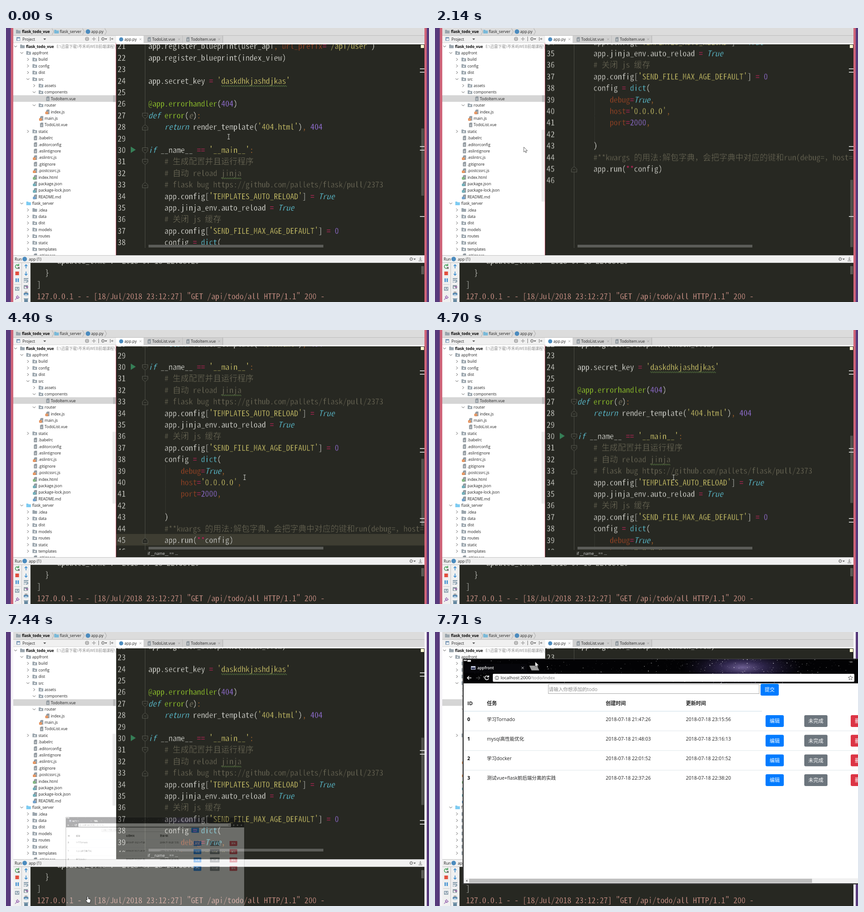
An HTML page that plays this animation: 929x603 px, repeating every 8000 ms.

```html
<!DOCTYPE html>
<html lang="zh">
<head>
<meta charset="utf-8">
<title>Editor session</title>
<style>
html, body { margin: 0; width: 100%; height: 100%; overflow: hidden; background: #573a7c; }
svg { display: block; width: 929px; height: 603px; }
text { font: 8.6px "Open Sans", "Noto Sans", "Noto Sans CJK SC", sans-serif; fill: #222; white-space: pre; }
.bold { font-size: 8.3px; font-weight: 700; fill: #000; }
.dim { fill: #8c8c8c; }
/* The background-coloured outline thins the strokes to a light weight. */
.code { font-family: "Noto Sans Mono CJK SC", "Liberation Mono", monospace; fill: #f8f8f2; stroke: #272822; stroke-width: .45px; }
.comment { fill: #75715e; }
.string { fill: #e6db74; }
.name { fill: #a6e22e; }
.key { fill: #66d9ef; font-style: italic; }
.builtin { fill: #66d9ef; }
.named { fill: #aa4926; }
.num { fill: #ae81ff; }
.op { fill: #f92672; }
.punct { fill: #cc7832; }
.param { fill: #8a8672; font-style: italic; }
.log { fill: #eda79b; }
.page { font-size: 10.5px; }
.head { font-size: 11px; font-weight: 700; }
.btn { font-size: 11px; fill: #fff; text-anchor: middle; }
</style>
</head>
<body>
<svg id="stage" viewBox="0 0 929 603"></svg>
<script>
const LOOP = 8000, LINE = 25.4, CHAR = 8.9, DARK = '#272822';

const rect = (x, y, w, h, fill, more = '') => `<rect x="${x}" y="${y}" width="${w}" height="${h}" fill="${fill}" ${more}/>`;
const text = (x, y, body, cls = '') => `<text x="${x}" y="${y}" class="${cls}">${body}</text>`;
const fill = (d, color, more = '') => `<path d="${d}" fill="${color}" ${more}/>`;
const line = (d, color, width = 1, more = '') => `<path d="${d}" fill="none" stroke="${color}" stroke-width="${width}" ${more}/>`;
const dot = (x, y, r, color) => `<circle cx="${x}" cy="${y}" r="${r}" fill="${color}"/>`;
const at = (x, y, body) => `<g transform="translate(${x} ${y})">${body}</g>`;
const clip = (id, x, y, w, h) => `<clipPath id="${id}">${rect(x, y, w, h, '#000')}</clipPath>`;
const clipped = (id, body) => `<g clip-path="url(#${id})">${body}</g>`;

// The monospaced size follows from the column width.
const pen = document.createElement('canvas').getContext('2d');
pen.font = '100px "Noto Sans Mono CJK SC", "Liberation Mono", monospace';
const codeSize = 100 * CHAR / pen.measureText('M').width;

const folder = (x, y, color, mark) => at(x, y,
  fill('M-5-4h4l1 1.5h5v6.5h-10z', color) + (mark ? rect(-1.5, -.5, 3, 2.5, '#fff') : ''));
const badges = { js: '#e07b39', html: '#5fa35f', json: '#4a9aa8', md: '#4a88c0' };
const file = (x, y, name) => {
  const badge = badges[name.split('.').pop()];
  return at(x, y, fill('M-1-5h5v10h-7v-8z', '#939ba1') + line('M-1 0h3M-1 2h3', '#fff', .8) +
    (badge ? rect(-5, 0, 6, 5, badge) + line('M-4 2.5h4', '#fff', .8) : ''));
};
const chevron = (x, y, open) => at(x, y, line(open ? 'M-3-1.5l3 3 3-3' : 'M-1.5-3l3 3-3 3', '#555'));
const gear = (x, y) => at(x, y, `<circle r="2.7" fill="none" stroke="#666" stroke-width="2" stroke-dasharray="1.4 .7"/>`);

// Sidebar rows: depth, then + folded, - open or = file.
const tree = `0-flask_todo_vue 1-appfront 2+build 2+config 2+dist 2-src 3+assets 3-components 4=TodoItem.vue
3-router 4=index.js 3=main.js 3=TodoList.vue 2+static 2=.babelrc 2=.editorconfig 2=.eslintignore
2=.eslintrc.js 2=.gitignore 2=.postcssrc.js 2=index.html 2=package.json 2=package-lock.json 2=README.md
1-flask_server 2+.idea 2+data 2+dist 2+models 2+routes 2+static 2+templates 2=.gitignore`.split(/\s+/);

function sidebar() {
  const rows = tree.map((entry, i) => {
    const depth = +entry[0], kind = entry[1], name = entry.slice(2);
    const x = 44 + 13.6 * depth, y = 40.4 + 14.4 * i;
    const icon = kind === '=' ? file(x - 7, y, name)
      : chevron(x - 23, y, kind === '-') +
        folder(x - 8, y, name === 'flask_server' ? '#7dcbf2' : '#9aa5ad', depth && !/flask_server|idea/.test(name));
    return icon + text(x, y + 3.2, name, depth ? '' : 'bold');
  }).join('');
  return rect(16, 33, 225, 467, '#fff') + clipped('side',
    rect(16, 148, 225, 14.5, '#d5d5d5') + rect(235, 148, 6, 14.5, '#bcbcbc') + rows +
    text(111, 43.6, 'E:\\迅雷下载\\岑禾屿WEB前端课程\\ja', 'dim')) +
    `<g id="sideThumb">${rect(234, 224, 7, 158, '#ececec')}</g>`;
}

function topBars() {
  const sep = x => line(`M${x} 1l4 7-4 7`, '#aaa');
  const tab = (x, w, name, color) => rect(x, 17, w, 16, color) + line(`M${x + w} 17v16`, '#aaa') +
    line(`M${x + w - 10} 22.5l4.5 4.5m0-4.5l-4.5 4.5`, '#999', .8) + text(x + 18, 28, name);
  return rect(16, 0, 903, 16, '#dcdcdc') + rect(16, 16, 226, 17, '#f0f0f0') + rect(242, 16, 677, 17, '#dadada') +
    line('M16 16.5h903M16 33h226', '#bdbdbd') + rect(242, 33, 677, 3, '#f4f4f4') +
    folder(27, 8, '#9aa5ad') + text(35, 11.2, 'flask_todo_vue', 'bold') + sep(101) +
    folder(111, 8, '#7ab9d8') + text(118, 11.2, 'flask_server') + sep(168) +
    dot(180, 8, 5, '#4b8bbe') + text(187, 11.2, 'app.py') + sep(217) +
    rect(23, 20, 8, 8, '#7f9cb8') + rect(25, 23, 5, 4, '#fff') + text(36, 27.5, 'Project') +
    fill('M82 23h6l-3 3.5z', '#555') +
    `<circle cx="178" cy="24" r="3.5" fill="none" stroke="#777" stroke-width="1.2"/>` + dot(178, 24, 1.3, '#777') +
    line('M189 24h8M193 20v3M193 25v3M203.5 19v10', '#777') + gear(213, 24) + fill('M217 23h5l-2.5 3z', '#555') +
    line('M229 20v8M231 24h5M234 22l-2 2 2 2', '#666') +
    tab(242, 61, 'app.py', '#fff') + dot(253, 25, 4.5, '#4b8bbe') +
    tab(303, 85, 'TodoList.vue', '#d0d0d0') + file(314, 25, 'a.vue') +
    tab(388, 88, 'TodoItem.vue', '#d0d0d0') + file(399, 25, 'a.vue');
}

const FIRST = 21;
const source = `app.register_blueprint(user_api, url_prefix='/api/user')
app.register_blueprint(index_view)

app.secret_key = 'daskdhkjashdjkas'

@app.errorhandler(404)
def error(e):
    return render_template('404.html'), 404

if __name__ == '__main__':
    # 生成配置并且运行程序
    # 自动 reload jinja
    # flask bug https://github.com/pallets/flask/pull/2373
    app.config['TEMPLATES_AUTO_RELOAD'] = True
    app.jinja_env.auto_reload = True
    # 关闭 js 缓存
    app.config['SEND_FILE_MAX_AGE_DEFAULT'] = 0
    config = dict(
        debug=True,
        host='0.0.0.0',
        port=2000,

    )
    #**kwargs 的用法:解包字典，会把字典中对应的键和run(debug=，host=，port=)
    app.run(**config)
`.split('\n');
const token = /(?<comment>#.*)|(?<string>'[^']*')|(?<name>@[\w.]+|error(?=\())|(?<key>\b(?:def|return|if|True)\b)|(?<builtin>\bdict\b)|(?<named>\b\w+(?==\S))|(?<num>\b\d+)|(?<op>[=*]+)|(?<punct>[,:])|(?<param>\be\b)|\w+|\s+|./g;
const paint = code => code.replace(token, (match, ...rest) => {
  const hit = Object.entries(rest.pop()).find(([, value]) => value);
  return hit ? `<tspan class="${hit[0]}">${match}</tspan>` : match;
});
const baseline = n => 71.8 + (n - 22) * LINE;

function editor() {
  const wave = (n, length) => line(`M472.7 ${baseline(n) + 5}` + 'q1-3 2 0t2 0'.repeat(Math.round(length * CHAR / 4)), '#6f9a52', .8);
  const fold = (n, up) => `<g transform="translate(305.5 ${baseline(n) - 5.5}) scale(1 ${up ? -1 : 1})">` +
    fill('M-6-6h12v7l-6 5-6-5z', DARK, 'stroke="#5b5c53"') + line('M-3-1h6', '#5b5c53') + '</g>';
  const lines = source.map((code, i) => text(245, baseline(FIRST + i), FIRST + i, 'code') +
    text(312.5, baseline(FIRST + i), paint(code), 'code')).join('');
  const guide = line(`M350.5 ${baseline(38) + 6}V${baseline(43) - 14}`, '#55564e', 1, 'stroke-dasharray="1 2"');
  const runMark = baseline(30) - 7;
  const ticks = [90, 97.5, 261, 269, 415].map(y => rect(909, y - 1, 10, 1.6, '#eee')).join('');
  return rect(242, 36, 677, 464, DARK) + line('M305.5 36V484', '#4d4e47') + clipped('code',
    `<g id="scroll"><g id="caretRow">${rect(242, baseline(45) - 20, 677, LINE, '#3e3d32')}${line(`M305.5 ${baseline(45) - 20}v${LINE}`, '#4d4e47')}</g>` +
    guide + lines + wave(24, 16) + wave(32, 5) +
    [27, 30, 31].map(n => fold(n)).join('') + [28, 33, 45].map(n => fold(n, true)).join('') +
    fill(`M274 ${runMark - 7}l11 7-11 7z`, '#367f57') + '</g>') +
    `<g id="thumb">${rect(912, 221, 6, 148, '#50514b')}</g>` + ticks +
    rect(911, 37, 7, 7, '#fffbd0') + rect(313, 477, 384, 6, '#5b5c58') +
    `<g id="crumb"><text x="311" y="495" style="fill:#ddd">if __name__ == ...</text>${rect(909, 422, 10, 1.6, '#eee')}</g>`;
}

function runPanel() {
  const blue = '#3f8fd0', arrow = (y, s) => at(44, y, line(`M0 ${4 * s}V${-4 * s}M-3 ${-s}L0 ${-4 * s} 3 ${-s}`, blue, 1.6));
  const out = [['    "updated_time": "2018-07-18 22:38:20"', ''], ['  }', ''], [']', ''],
    ['127.0.0.1 - - [18/Jul/2018 23:12:27] "GET /api/todo/all HTTP/1.1" 200 -', 'log']];
  return rect(16, 500, 903, 17, '#f0f0f0') + line('M16 500.5h903M16 516.5h903', '#c4c4c4') +
    text(19, 511.7, 'Run') + dot(41, 508.5, 5, '#4b8bbe') + text(50, 511.7, 'app (1)') +
    gear(890, 508.5) + fill('M895 507.5h5l-2.5 3z', '#555') + line('M910 504v6M907.5 508l2.5 2.5 2.5-2.5M906 512.5h8', '#666') +
    rect(16, 517, 38, 86, '#f0f0f0') + line('M34.5 517v86M53.5 517v86', '#c4c4c4') +
    line('M28 523a4 4 0 1 0 0 4M28 519v4h-4', '#48a05c', 1.6) + rect(26, 526, 4, 4, '#777') +
    rect(20.5, 536, 8, 8, '#e2503f') + rect(21, 551, 2.6, 8, blue) + rect(25.5, 551, 2.6, 8, blue) +
    line('M18 564.5h14', '#ccc') + rect(20, 570, 9, 8, '#6c8598') + rect(21, 571.5, 3, 2.5, '#fff') + rect(25.5, 571.5, 2.5, 2.5, '#fff') + rect(21, 575, 7, 1.5, '#fff') +
    line('M20 598l4-4M22 591l5 5M25 589l4 4-4 2-2-2z', '#a276b8', 1.5) +
    arrow(525, 1) + arrow(540, -1) +
    line('M39 551.5h10M39 555h8q2 2 0 4h-4M39 559h2', '#58798e', 1.3) +
    rect(39, 566, 9, 8, '#8795a0') + rect(41, 569, 4, 4, '#fff') + line('M43 570h6', '#a653a8', 1.6) +
    rect(39, 583, 10, 5, '#5a89b0') + rect(41, 580, 6, 3, '#aaa') + rect(41, 586, 6, 4, '#b8d4e8') +
    rect(40, 597, 8, 6, '#6789a0') + rect(39, 595, 10, 1.5, '#6789a0') +
    rect(54, 517, 865, 86, DARK) + clipped('console', out.map(([s, c], i) => text(68, 519.4 + 25.8 * i, s, 'code ' + c)).join('')) +
    rect(912, 524, 6, 18, '#5a5b55');
}

function stars() {
  let seed = 7, body = '';
  const rnd = () => (seed = seed * 16807 % 2147483647) / 2147483647;
  for (let i = 0; i < 650; i++) {
    const near = i % 5 < 2;
    const x = near ? 675 + (rnd() + rnd() + rnd() - 1.5) * 170 : 63 + rnd() * 926;
    body += `<circle cx="${x.toFixed(1)}" cy="${(60 + rnd() * 53).toFixed(1)}" r="${(.25 + rnd() ** 4 * .7).toFixed(2)}" opacity="${(.3 + rnd() * .7).toFixed(2)}"/>`;
  }
  return `<g fill="#fff">${body}</g>`;
}

function browser() {
  const button = (x, y, w, label, color) => rect(x, y, w, 26, color, 'rx="3"') + text(x + w / 2, y + 17.3, label, 'btn');
  const todos = [['学习Tornado', '21:47:26', '23:15:56'], ['mysql高性能优化', '21:48:03', '23:16:13'],
    ['学习docker', '22:01:52', '22:01:52'], ['测试vue+flask前后端分离的实践', '22:37:26', '22:38:20']];
  const rows = todos.map(([task, made, changed], i) => {
    const y = 43.3 * i, base = 195.5 + y;
    return line(`M63 ${174.3 + y}h${i ? 926 : 655}`, i ? '#dee6ea' : '#c9dde8') +
      text(71, base, i, 'page bold') + text(114, base, task, 'page') +
      text(375, base, '2018-07-18 ' + made, 'page') + text(551, base, '2018-07-18 ' + changed, 'page') +
      button(726, 183 + y, 40, '编辑', '#007bff') + button(811, 183 + y, 51, '未完成', '#6c757d') +
      button(913, 183 + y, 40, '删除', '#dc3545');
  }).join('');
  return rect(60.5, 58.5, 930, 497, '#3a3a3a') + rect(63, 60, 926, 53, '#020204') + rect(63, 60, 926, 53, 'url(#nebula)') + stars() +
    rect(63, 61, 7, 3, '#bbb') + rect(71, 61.5, 8, 4, '#eee', 'rx="1"') +
    rect(65, 70, 137, 20, '#06060a') + rect(79, 75, 10, 8, '#c5cbe0') + rect(80, 78, 8, 4, '#3b4262') +
    `<text x="93" y="82" style="fill:#fff;font-weight:600">appfront</text>` +
    line('M190 76.5l5 5m0-5l-5 5', '#ddd') + fill('M207 74h17l5 10.5h-17z', '#9b9b9b') + line('M911 66h6', '#ddd') +
    line('M80 101h-9M75 97l-4 4 4 4', '#fff', 1.5) + line('M90 101h8M95 97.5l4 3.5-4 4', '#444', 1.3) +
    line('M117 98a4.3 4.3 0 1 0 .8 4M118 95.5v3.5h-3.5', '#fff', 1.5) +
    rect(127, 92, 794, 17.5, '#fff', 'rx="2"') +
    `<circle cx="136" cy="101" r="4" fill="none" stroke="#555"/>` + line('M136 100v3.5M136 98v1', '#555') +
    `<text x="144" y="104.3" style="font-size:9.8px">localhost:2000<tspan fill="#888">/todo/index</tspan></text>` +
    line('M912.5 96l1.4 3.2 3.6.3-2.7 2.3.8 3.4-3.1-1.8-3.1 1.8.8-3.4-2.7-2.3 3.6-.3z', '#555', .9) +
    [935, 955, 975].map(x => dot(x, 101, 3.5, '#aaa')).join('') +
    rect(63, 113, 926, 440, '#fff') + rect(249, 115.5, 463, 20, '#fff', 'stroke="#a6a6a6"') +
    text(250, 129.8, '请输入你想添加的todo', 'page dim') + button(715, 114, 40, '提交', '#007bff') +
    [[71, 'ID'], [114, '任务'], [375, '创建时间'], [551, '更新时间']].map(([x, s]) => text(x, 161, s, 'head')).join('') +
    rows + rect(63, 542, 926, 11, '#f1f1f1') + rect(75, 543, 753, 9, '#bfbfbf') + fill('M71 545v5l-3-2.5z', '#666');
}

const pointers = {
  beam: line('M-2.5-5h5M0-5V5.5M-2.5 5.5h5', '#d8d8d4'),
  arrow: fill('M0 0V11L2.6 8.7 4.3 12.6 6 11.9 4.3 8.1H8Z', '#fff', 'stroke="#222" stroke-width=".7"'),
  hand: fill('M-2-6.5q1.5-1.5 3 0v4.5l4 1q1.5.5 1 2.5l-1 5.5h-5.5l-4.5-5.5q0-2 3-.5z', '#fff', 'stroke="#111" stroke-width=".9"')
};

const stage = document.getElementById('stage');
stage.innerHTML = `<defs>${clip('side', 16, 33, 225, 467)}${clip('code', 242, 36, 677, 448)}${clip('console', 54, 517, 865, 86)}
  <radialGradient id="nebula" gradientUnits="userSpaceOnUse" cx="0" cy="0" r="1" gradientTransform="translate(675 78) scale(135 42)">
  <stop offset="0" stop-color="#8a78b8" stop-opacity=".8"/><stop offset=".35" stop-color="#4a3c78" stop-opacity=".6"/><stop offset="1" stop-color="#20183c" stop-opacity="0"/></radialGradient></defs>` +
  rect(0, 0, 929, 603, '#573a7c') + rect(10.5, 0, 913.5, 603, '#cf6579', 'id="frame"') +
  topBars() + sidebar() + editor() + runPanel() + `<g id="browser">${browser()}</g>` +
  Object.entries(pointers).map(([kind, shape]) => `<g id="${kind}">${shape}</g>`).join('');
stage.querySelectorAll('.code').forEach(node => node.style.fontSize = codeSize + 'px');

// Plays rows of [time, ...values], holding each until the next.
function play(id, rows, style) {
  const frames = rows.map(([time, ...values]) => ({ offset: time / LOOP, easing: 'steps(1, end)', ...style(...values) }));
  frames.push({ ...frames[frames.length - 1], offset: 1 });
  document.getElementById(id).animate(frames, { duration: LOOP, iterations: Infinity });
}
const moveY = y => ({ transform: `translate(0px, ${y}px)` });
const show = opacity => ({ opacity });

const scroll = [[0, 0], [280, 152.4], [410, 228.6], [1630, 304.8], [1750, 339.6], [4280, 263.4], [4400, 187.2], [4550, 111], [4700, 34.8]];
play('scroll', scroll, y => moveY(-y));
play('thumb', scroll, y => moveY(y / 3));
play('sideThumb', [[0, 0], [2020, 1]], show);
play('caretRow', [[0, 0], [3880, 1]], show);
play('crumb', [[0, 0], [4130, 1]], show);
play('frame', [[0, '#cf6579'], [7320, '#f6f4f8']], color => ({ fill: color }));
play('browser', [[0, 105.5, 382.5, .422, 0], [7440, 105.5, 382.5, .422, .32], [7590, 0, 0, 1, 1]],
  (x, y, size, opacity) => ({ transform: `translate(${x}px, ${y}px) scale(${size})`, opacity }));

const path = [
  [0, 489, 239, 'beam'], [680, 508, 259, 'beam'], [800, 523.5, 277, 'beam'],
  [1870, 171, 300, 'arrow'], [2020, 117, 290, 'arrow'], [2140, 195, 262, 'arrow'], [2260, 287, 231, 'beam'],
  [2410, 331, 170, 'beam'], [2560, 351, 110, 'beam'], [2690, 332, 72, 'beam'],
  [2830, 315, 50, 'beam'], [2950, 300, 40, 'beam'], [3080, 298, 38, 'beam'],
  [3220, 290, 37, 'beam'], [3340, 302, 75, 'beam'], [3460, 345, 160, 'beam'], [3580, 387, 249, 'beam'],
  [3730, 408, 317, 'beam'], [4130, 486, 318, 'beam'], [4400, 524, 324, 'beam'], [4860, 514.5, 257.5, 'beam'],
  [5010, 514.5, 257.5, ''], [5280, 333, 20, 'arrow'], [5400, 333, 21, 'arrow'], [5550, 339, 22, 'arrow'],
  [5710, 370, 32, 'arrow'], [5850, 409, 130, 'beam'], [5970, 375, 290, 'beam'], [6090, 325, 430, 'beam'],
  [6220, 294, 487, 'arrow'], [6370, 294, 487, ''], [7200, 180, 589, 'hand'], [7710, 220, 65.5, 'arrow']
];
for (const kind of Object.keys(pointers)) {
  play(kind, path, (x, y, now) => ({ transform: `translate(${x}px, ${y}px)`, opacity: now === kind ? 1 : 0 }));
}
</script>
</body>
</html>
```
